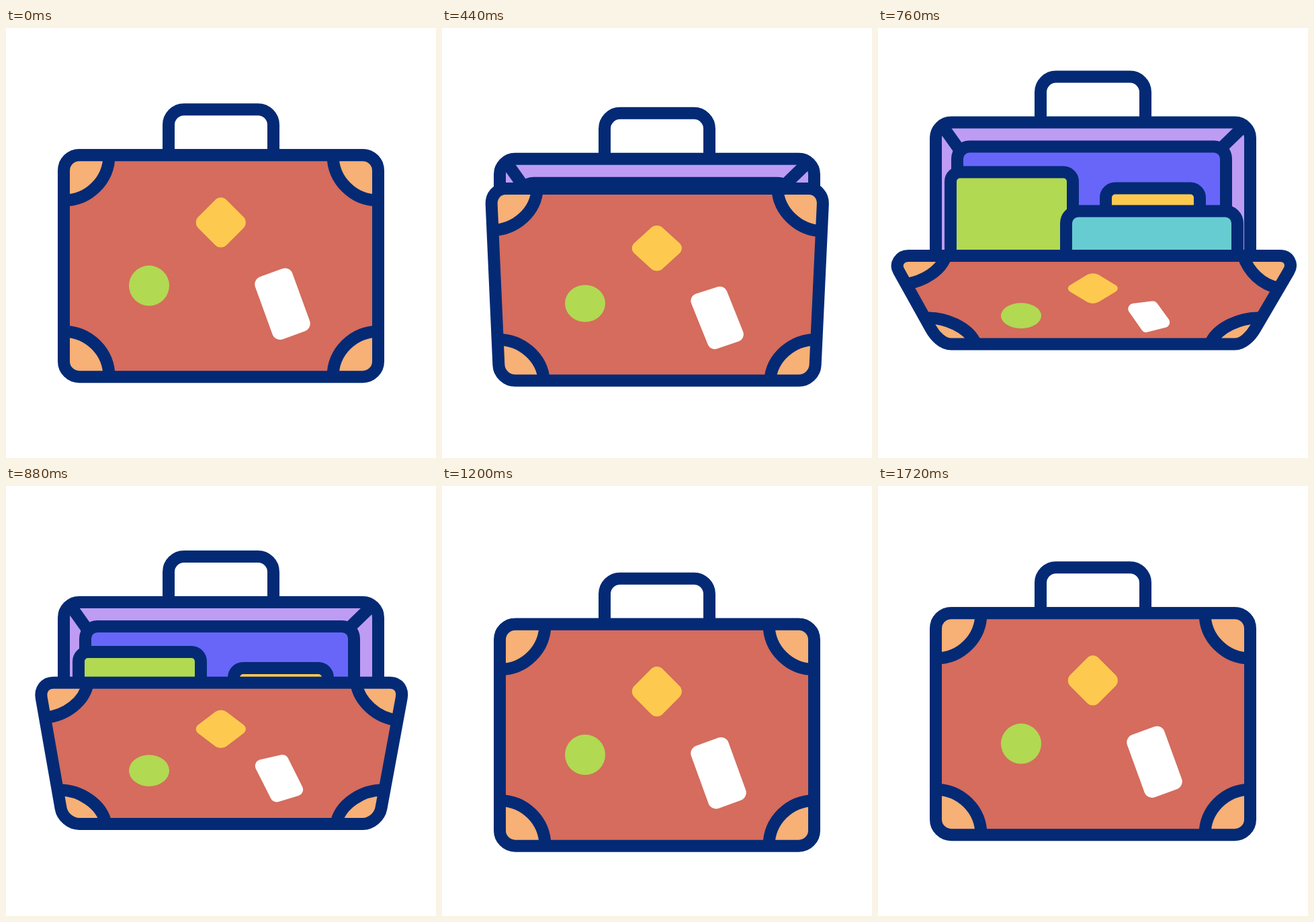
Write an HTML page with a canvas that moves like this. It is 640 px wide and 640 px high and loops after 2.08 s.

```html
<!DOCTYPE html>
<html lang="en">
<head>
<meta charset="utf-8">
<title>Suitcase</title>
<style>
  html, body { margin: 0; width: 100%; height: 100%; overflow: hidden; background: #fff; }
  canvas { display: block; width: 640px; height: 640px; }
</style>
</head>
<body>
<canvas id="stage" width="640" height="640"></canvas>
<script>
const ctx = document.getElementById('stage').getContext('2d');
const LOOP = 2080, STEP = 40;
const NAVY = '#042a75', CORAL = '#d56c5d', PEACH = '#f7b075', YELLOW = '#fdca4f',
      GREEN = '#b1d952', LILAC = '#be9cf4', VIOLET = '#6866f9', TEAL = '#67ccd1';

// [time, value] keys with an ease in and out between them
const LIFT = [[0, 0], [320, 21.3], [720, -51.5], [1080, 33], [1360, -9], [1600, 2.5], [1720, 0]];
const OPEN = [[320, 0], [720, 1], [1080, 0]];

function ease(keys, time) {
  if (time <= keys[0][0]) return keys[0][1];
  for (let i = 1; i < keys.length; i++) {
    const [t0, v0] = keys[i - 1], [t1, v1] = keys[i];
    if (time < t1) {
      const p = (time - t0) / (t1 - t0);
      return v0 + (v1 - v0) * p * p * (3 - 2 * p);
    }
  }
  return keys[keys.length - 1][1];
}

function paint(path, fill, outlined = true) {
  if (fill) {
    ctx.fillStyle = fill;
    ctx.fill(path);
  }
  if (outlined) ctx.stroke(path);
}

function box(left, top, right, bottom, radius, fill) {
  const path = new Path2D();
  path.roundRect(left, top, right - left, bottom - top, radius);
  paint(path, fill);
}

function line(x0, y0, x1, y1) {
  const path = new Path2D();
  path.moveTo(x0, y0);
  path.lineTo(x1, y1);
  ctx.stroke(path);
}

function drawInside(rim) {
  ctx.save();
  ctx.beginPath();
  ctx.rect(0, 0, 640, rim + 12);
  ctx.clip();
  box(242, 121, 398, 240, 23);
  box(86, 189, 554, 519, 23, LILAC);
  line(93, 164 + 26, 125, 235);
  line(547, 192, 511, 227);
  box(118, 225, 518, 519, 18, VIOLET);
  box(339, 287, 479, 519, 14, YELLOW);
  box(108, 263, 290, 519, 14, GREEN);
  box(280, 321, 535, 519, 18, TEAL);
  ctx.restore();
}

// Geometry of one half of the front; the right half is mirrored and leans a little further
function frontSide(open, rim, mirrored) {
  const lean = mirrored ? { side: 59.5, rim: 70, arc: 59, drop: 20 }
                        : { side: 57, rim: 66, arc: 54, drop: 26 };
  const base = 519;
  const upper = { x: 86 - lean.side * open, y: rim + 23 };
  const lower = { x: 86 - 7.5 * open, y: base - 23 };
  const slope = (lower.x - upper.x) / (lower.y - upper.y);
  const length = Math.hypot(slope, 1);
  const sideX = y => upper.x + (y - upper.y) * slope;
  const handle = { x: 12.7 * slope / length, y: 12.7 / length };
  const flip = points => points.map(([x, y]) => [mirrored ? 640 - x : x, y]);

  const topX = 153.5 - lean.arc * open;
  const topY = rim + 67.5 - lean.drop * open;
  const lowX = 153.5 - 8 * open;
  const lowY = base - 67.5 + 29.5 * open;
  return {
    outline: flip([
      [109 - lean.rim * open, rim],
      [96.3 - lean.rim * open, rim],
      [upper.x - handle.x, upper.y - handle.y],
      [upper.x, upper.y],
      [lower.x, lower.y],
      [lower.x + handle.x, lower.y + handle.y],
      [96.3, base],
      [109, base]
    ]),
    patches: [
      flip([
        [topX, rim],
        [topX - 8 * open, rim + 37.3 * (1 - 0.4 * open)],
        [sideX(topY) + 37.3 * (1 - 0.3 * open), topY - 5 * open],
        [sideX(topY), topY],
        [upper.x - 20, rim]
      ]),
      flip([
        [lowX, base],
        [lowX - 10 * open, base - 37.3 * (1 - 0.35 * open)],
        [sideX(lowY) + 37.3 * (1 - 0.2 * open), lowY - 2 * open],
        [sideX(lowY), lowY],
        [lower.x - 10, base]
      ])
    ]
  };
}

function drawPatch([start, c1, c2, end, corner]) {
  const arc = new Path2D();
  arc.moveTo(...start);
  arc.bezierCurveTo(...c1, ...c2, ...end);
  const area = new Path2D(arc);
  area.lineTo(...corner);
  area.closePath();
  paint(area, PEACH, false);
  ctx.stroke(arc);
}

function drawStickers(open) {
  const disc = new Path2D();
  disc.ellipse(213, 383.4 + 96.5 * open, 30, 30 * (1 - 0.38 * open), 0, 0, 2 * Math.PI);
  paint(disc, GREEN, false);

  ctx.save();
  ctx.translate(319.8, 289.2 + 152 * open);
  ctx.scale(1, 1 - 0.41 * open);
  ctx.rotate(Math.PI / 4);
  const diamond = new Path2D();
  diamond.roundRect(-29.7, -29.7, 59.4, 59.4, 12);
  paint(diamond, YELLOW, false);
  ctx.restore();

  const tag = [
    [366.9 - open, 374.1 + 89 * open],
    [422.3 - 10 * open, 353.9 + 104 * open],
    [456.1 - 17 * open, 446.9 + 46 * open],
    [400.7 - 5 * open, 467.1 + 36.5 * open]
  ];
  const label = new Path2D();
  label.moveTo((tag[0][0] + tag[3][0]) / 2, (tag[0][1] + tag[3][1]) / 2);
  tag.forEach((point, i) => label.arcTo(...point, ...tag[(i + 1) % 4], 12 - 4 * open));
  label.closePath();
  paint(label, '#fff', false);
}

function drawFront(open, rim) {
  const left = frontSide(open, rim, false);
  const right = frontSide(open, rim, true);
  const a = left.outline, b = right.outline;
  const body = new Path2D();
  body.moveTo(...a[0]);
  body.bezierCurveTo(...a[1], ...a[2], ...a[3]);
  body.lineTo(...a[4]);
  body.bezierCurveTo(...a[5], ...a[6], ...a[7]);
  body.lineTo(...b[7]);
  body.bezierCurveTo(...b[6], ...b[5], ...b[4]);
  body.lineTo(...b[3]);
  body.bezierCurveTo(...b[2], ...b[1], ...b[0]);
  body.closePath();

  paint(body, CORAL, false);
  ctx.save();
  ctx.clip(body);
  [...left.patches, ...right.patches].forEach(drawPatch);
  ctx.restore();
  drawStickers(open);
  ctx.stroke(body);
}

function draw(time) {
  const open = ease(OPEN, time);
  const rim = 528 - 348 * (1 - 0.59 * open) + 9;
  ctx.fillStyle = '#fff';
  ctx.fillRect(0, 0, 640, 640);
  ctx.save();
  ctx.translate(0, 0.2 + ease(LIFT, time));
  ctx.strokeStyle = NAVY;
  ctx.lineWidth = 18;
  drawInside(rim);
  drawFront(open, rim);
  ctx.restore();
}

const start = performance.now();
function tick() {
  const time = (performance.now() - start) % LOOP;
  draw(Math.floor(time / STEP) * STEP);
  requestAnimationFrame(tick);
}
tick();
</script>
</body>
</html>
```
